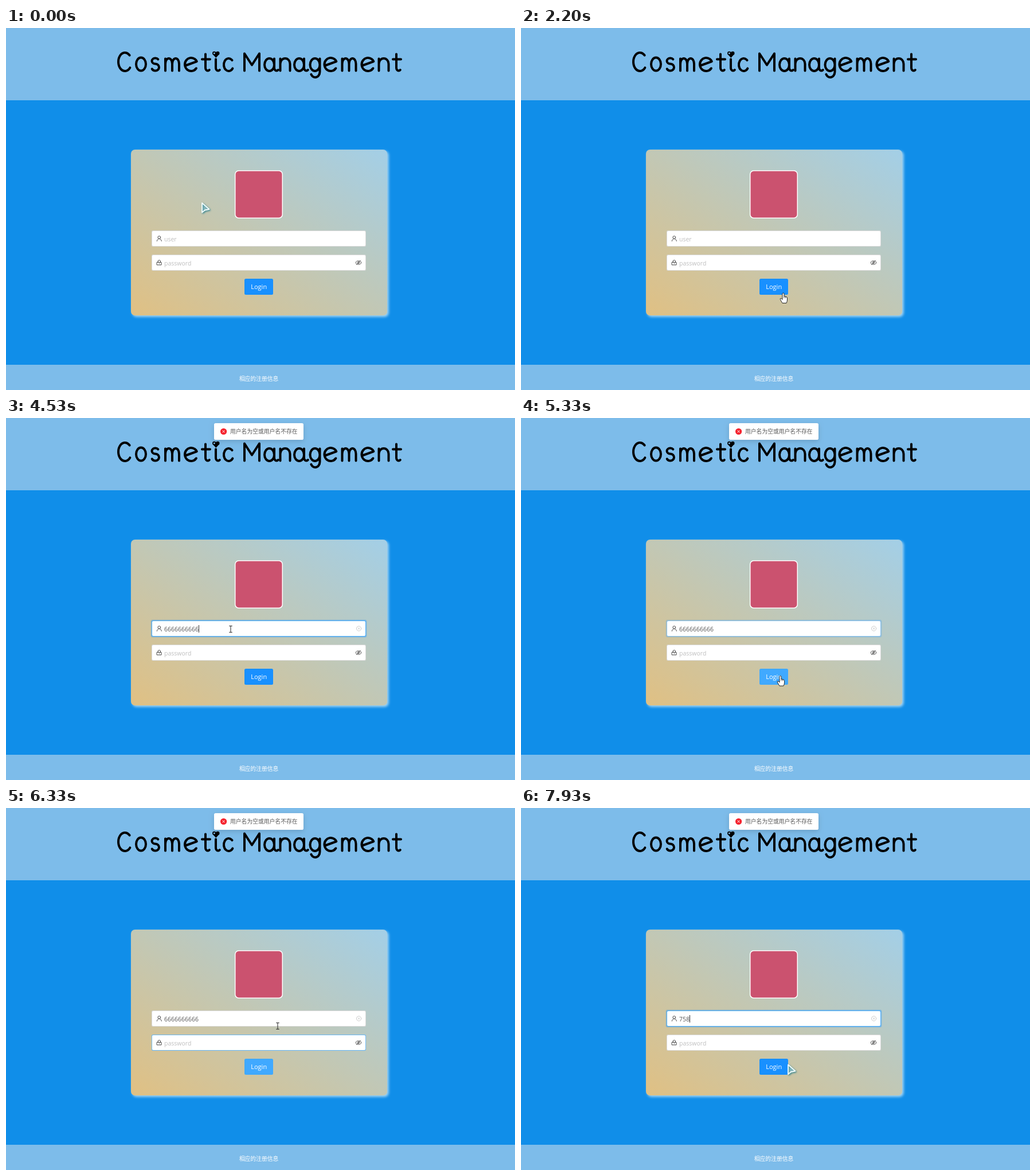
An HTML page with a canvas that plays this animation: 888x631 px, repeating every 8000 ms.

```html
<!DOCTYPE html>
<html lang="en">
<head>
<meta charset="utf-8">
<title>Cosmetic Management</title>
<style>
html, body { margin: 0; width: 100%; height: 100%; overflow: hidden; background: #108ee9; }
canvas { display: block; }
</style>
</head>
<body>
<canvas id="stage" width="888" height="631" role="img" aria-label="Cosmetic Management login form"></canvas>
<script>
const ctx = document.getElementById('stage').getContext('2d');
const LOOP = 8000, STEP = 200 / 3, FADE = 300;
const LATIN = '"Open Sans", "Noto Sans", sans-serif';
const CJK = '"Noto Sans CJK SC", "Noto Sans CJK", sans-serif';
const BLUE = [24, 144, 255], LIGHT_BLUE = [64, 169, 255], GREY = [217, 217, 217];
const INK = '#484848';

const clamp = (v, lo = 0, hi = 1) => Math.min(hi, Math.max(lo, v));
const smooth = p => p * p * (3 - 2 * p);
const easeOutCirc = p => Math.sqrt(1 - (1 - clamp(p)) ** 2);
const mix = (a, b, p) => `rgb(${a.map((v, i) => Math.round(v + (b[i] - v) * p))})`;

// Each span [on, off] fades in at its start and out at its end.
const level = (t, spans) => spans.reduce(
  (sum, [on, off]) => sum + smooth(clamp((t - on) / FADE)) - smooth(clamp((t - off) / FADE)), 0);

const userFocus = [[3200, 5200], [6733, LOOP]];
const userHover = [[1400, 1533], [2800, 5200], [6340, LOOP]];
const passFocus = [[6330, 6733]];
const passHover = [[1533, 1600], [6130, 6733]];
const loginLit = [[2200, 3200], [4850, 6333]];

// Pointer stops: arrive, leave, x, y.
const stops = [
  [0, 467, 341, 304], [933, 933, 464, 270], [1333, 1333, 425, 250], [1733, 1867, 450, 436],
  [2000, 2000, 461, 469], [2200, 2200, 457.5, 462], [2400, 2600, 450, 452],
  [2933, 3200, 389.5, 366.5], [3600, 4533, 392, 368], [4933, 5867, 452.5, 449.5],
  [6333, 6333, 474, 380], [6733, 7600, 432, 368], [7933, LOOP, 465, 446.5]
];

const typing = { text: '6666666666', start: 4132, gap: 36, count: 10 };
const clearing = { start: 6932, gap: 26, count: 10 };
const retyping = { text: '758', start: 7199, gap: 133, count: 3 };
const done = (edit, t) => clamp(Math.floor((t - edit.start) / edit.gap) + 1, 0, edit.count);

function userValue(t) {
  return t < retyping.start
    ? typing.text.slice(0, done(typing, t) - done(clearing, t))
    : retyping.text.slice(0, done(retyping, t));
}

function caretOn(t) {
  const span = userFocus.find(([on, off]) => t > on && t < off);
  if (!span) return false;
  const edits = [typing, clearing, retyping].filter(e => t >= e.start);
  const last = edits.map(e => e.start + e.gap * (done(e, t) - 1));
  return (t - Math.max(span[0] + 133, ...last)) % 1060 < 530;
}

function pointerAt(t) {
  const next = stops.findIndex(s => s[0] > t);
  const a = stops[next < 0 ? stops.length - 1 : next - 1], b = stops[next] || a;
  const p = a === b ? 0 : smooth(clamp((t - a[1]) / (b[0] - a[1])));
  return [a[2] + (b[2] - a[2]) * p, a[3] + (b[3] - a[3]) * p];
}

// Lettering pen; angles are in half turns, baseline at y = 0.
class Pen extends Path2D {
  bow(cx, cy, rx, ry, from, to) {
    const a = from * Math.PI;
    this.moveTo(cx + rx * Math.cos(a), cy + ry * Math.sin(a));
    this.ellipse(cx, cy, rx, ry, 0, a, to * Math.PI);
    return this;
  }
  poly(...points) {
    points.forEach(([x, y], i) => i ? this.lineTo(x, y) : this.moveTo(x, y));
    return this;
  }
  stem(x, top, bottom = 0) { return this.poly([x, top], [x, bottom]); }
  arch(x, w) { return this.bow(x + w / 2, -12, w / 2, 9.5, 1, 2).stem(x + w, -12); }
  bowl() { return this.bow(8.5, -10.5, 8.5, 11, 0, 2); }
  foot(x) { return this.bow(x + 4, -5, 4, 5, .25, 1); }
}
const pen = () => new Pen();

// Letter: [advance, path].
const letters = {
  C: [31, pen().bow(11.5, -15.5, 11.5, 16, .22, 1.75)],
  o: [26, pen().bow(8.5, -11.5, 8.5, 11.5, 0, 2)],
  s: [24, pen().bow(7.5, -17, 6, 5, .5, 1.8).bow(7.5, -6, 6.5, 6, 1.5, 2.85)],
  m: [35, pen().stem(1, -21).arch(1, 12).arch(13, 12)],
  e: [30, pen().bow(11, -11, 11, 11.5, .2, 1.85).poly([1, -9], [20.8, -16.2])],
  t: [24, pen().stem(6, -29, -5).foot(6).poly([0, -20], [14, -20])],
  i: [14, pen().stem(0, -20, -5).foot(0)],
  c: [17, pen().bow(8.5, -10.5, 8.5, 11, .2, 1.75)],
  ' ': [19, pen()],
  M: [35, pen().poly([0, 0], [0, -30], [13, -10], [26, -30], [26, 0])],
  a: [27.5, pen().bowl().stem(17, -21, -5).foot(17)],
  n: [24.5, pen().stem(0, -21).arch(0, 17)],
  g: [25, pen().bowl().stem(17, -21, 2).bow(9, 2, 8, 9.5, 0, .85)]
};

const arrow = new Path2D('M1 1V17.5L6 13.5L13.5 12Z');
const hand = new Path2D('M-1.5 10V1.5Q-1.5 0 0 0Q1.5 0 1.5 1.5V5.5L4 6Q7 6.5 7 9V12Q7 14.5 5.5 17.5H-1.5L-5 11.5Q-6 9-4 9.3L-1.5 11Z');

function at(x, y, draw) {
  ctx.save();
  ctx.translate(x, y);
  draw();
  ctx.restore();
}

function stroke(path, color, width = 1) {
  ctx.strokeStyle = color;
  ctx.lineWidth = width;
  ctx.stroke(path);
}

function box(x, y, w, h, r, fill) {
  ctx.beginPath();
  ctx.roundRect(x, y, w, h, r);
  ctx.fillStyle = fill;
  ctx.fill();
}

function disc(x, y, r, fill) {
  ctx.beginPath();
  ctx.arc(x, y, r, 0, 7);
  ctx.fillStyle = fill;
  ctx.fill();
}

function label(text, x, y, size, color, family = LATIN, align = 'left') {
  ctx.font = `${size}px ${family}`;
  ctx.textAlign = align;
  ctx.fillStyle = color;
  ctx.fillText(text, x, y);
}

function shadow(color = 'transparent', blur = 0, dx = 0, dy = 0) {
  ctx.shadowColor = color;
  ctx.shadowBlur = blur;
  ctx.shadowOffsetX = dx;
  ctx.shadowOffsetY = dy;
}

const cross = r => pen().poly([-r, -r], [r, r]).poly([r, -r], [-r, r]);

function drawTitle() {
  ctx.lineCap = ctx.lineJoin = 'round';
  let x = 196;
  for (const ch of 'Cosmetic Management') {
    const [advance, path] = letters[ch];
    at(x, 74.5, () => stroke(path, '#000', 4));
    x += advance;
  }
  at(366.3, 44, () => {
    disc(-3, 0, 3.2, '#000');
    disc(3, 0, 3.2, '#000');
    ctx.fill(pen().poly([-5.6, 1.8], [0, 8], [5.6, 1.8], [0, -1]));
    disc(-3, 0, 1.5, '#7dbcea');
  });
}

function drawPage() {
  ctx.fillStyle = '#108ee9';
  ctx.fillRect(0, 0, 888, 631);
  ctx.fillStyle = '#7dbcea';
  ctx.fillRect(0, 0, 888, 126);
  ctx.fillRect(0, 587, 888, 44);
  drawTitle();
  label('相应的注册信息', 441, 615, 9.8, '#fff', CJK, 'center');

  // Gradient runs square to the falling diagonal of the card.
  const x = 218, y = 212, w = 447, h = 289, k = w * h / (w * w + h * h);
  const cx = x + w / 2, cy = y + h / 2;
  const fill = ctx.createLinearGradient(cx - h * k, cy + w * k, cx + h * k, cy - w * k);
  fill.addColorStop(0, '#e0c083');
  fill.addColorStop(1, '#a3cfe7');
  shadow('#a5d5f2', 4.5, 2.5, 2.5);
  box(x, y, w, h, 7, fill);
  shadow();
  box(399, 248, 84, 84, 7, '#fff');
  box(400.5, 249.5, 81, 81, 5.6, '#cb526f');
}

function drawField(y, border, glow) {
  box(252.6, y - 1.4, 376.8, 30.8, 3, `rgba(24,144,255,${.3 * glow})`);
  box(254, y, 374, 28, 2.5, mix(GREY, LIGHT_BLUE, border));
  box(254.9, y + .9, 372.2, 26.2, 2, '#fff');
}

function drawIcons() {
  at(267.3, 365, () => stroke(pen().bow(0, 0, 2.4, 2.4, 0, 2).bow(0, 6.5, 4, 4, 1, 2), INK));
  at(267.3, 409, () => {
    ctx.strokeStyle = INK;
    ctx.strokeRect(-3.8, -.5, 7.5, 4.5);
    stroke(pen().bow(0, -2.2, 2.2, 2.2, 1, 2).stem(-2.2, -2.2, -.5).stem(2.2, -2.2, -.5).stem(0, 1, 2), INK);
  });
  at(615, 409, () => stroke(
    pen().bow(0, 0, 4.6, 3.1, 0, 2).bow(0, 0, 1.6, 1.6, 0, 2).poly([-3.6, 3.7], [3.6, -3.9]), INK, .9));
}

function drawForm(t) {
  drawField(353, level(t, userHover), level(t, userFocus));
  drawField(395, level(t, passHover), level(t, passFocus));
  drawIcons();

  const value = userValue(t);
  label(value || 'user', 276, 371.7, 10.5, value ? '#595959' : '#bfbfbf');
  if (caretOn(t)) {
    const width = value ? ctx.measureText(value).width : 0;
    ctx.fillStyle = '#333';
    ctx.fillRect(Math.round(276 + width), 361, 1, 13);
  }
  if (value) at(615.6, 367, () => stroke(pen().bow(0, 0, 4.2, 4.2, 0, 2), '#c8c8c8', .9));
  if (value) at(615.6, 367, () => stroke(cross(1.4), '#c8c8c8', .9));
  label('password', 276, 413.7, 10.5, '#bfbfbf');

  box(416, 437, 50, 28, 2.5, mix(BLUE, LIGHT_BLUE, level(t, loginLit)));
  label('Login', 441.2, 455, 11, '#fff', LATIN, 'center');
}

function drawToast(y, alpha) {
  ctx.globalAlpha = alpha;
  shadow('rgba(0,0,0,.15)', 8.4, 0, 2.8);
  box(363, y, 156, 29, 2.8, '#fff');
  shadow();
  at(379.6, y + 14.5, () => {
    disc(0, 0, 5.6, '#f5222d');
    stroke(cross(1.7), '#fff');
  });
  label('用户名为空或用户名不存在', 391, y + 18.1, 9.8, '#595959', CJK);
  ctx.globalAlpha = 1;
}

function drawToasts(t) {
  const top = 9, slot = 40.2, pad = 5.6;
  const first = 2433, second = 5400, leaving = 5625, gone = 5790;
  const enter = start => easeOutCirc((t - start) / FADE);
  const out = clamp((t - leaving) / FADE);
  if (t > first && t < gone) {
    const e = enter(first);
    drawToast(top - slot * (1 - e) - pad * out, e * (1 - out));
  }
  if (t > second) {
    const e = enter(second), below = t < gone ? slot - 2 * pad * out : 0;
    drawToast(top + below - slot * (1 - e), e);
  }
}

function drawBeam() {
  const serif = s => pen().bow(-1.3, s * 4.5, 1.3, s, 0, s * .5).bow(1.3, s * 4.5, 1.3, s, 1 - s * .5, 1);
  stroke(pen().stem(0, -4.5, 4.5).poly([-2.3, -5.5], [2.3, -5.5]).poly([-2.3, 5.5], [2.3, 5.5]), '#222');
}

function drawHand() {
  ctx.fillStyle = '#fff';
  ctx.fill(hand);
  stroke(hand, '#111', .9);
  stroke(pen().stem(1.5, 5.5, 8.5).stem(4, 6.2, 8.5), '#111', .7);
}

function drawArrow() {
  shadow('rgba(40,125,140,.75)', 3, 1.5, 1.5);
  ctx.fillStyle = '#8fbcc0';
  ctx.fill(arrow);
  stroke(arrow, '#f4ffff', 1.8);
  shadow();
}

function drawPointer(t) {
  const [x, y] = pointerAt(t);
  const inside = (l, top, w, h) => x >= l && x < l + w && y >= top && y < top + h;
  const onField = inside(254, 353, 374, 28) || inside(254, 395, 374, 28);
  at(x, y, inside(416, 437, 48.8, 28) ? drawHand : onField ? drawBeam : drawArrow);
}

const began = performance.now();

function frame() {
  const elapsed = (performance.now() - began) % LOOP;
  const t = Math.floor((elapsed + 4) / STEP) * STEP;
  drawPage();
  drawForm(t);
  drawToasts(t);
  drawPointer(t);
  requestAnimationFrame(frame);
}
frame();
</script>
</body>
</html>
```
